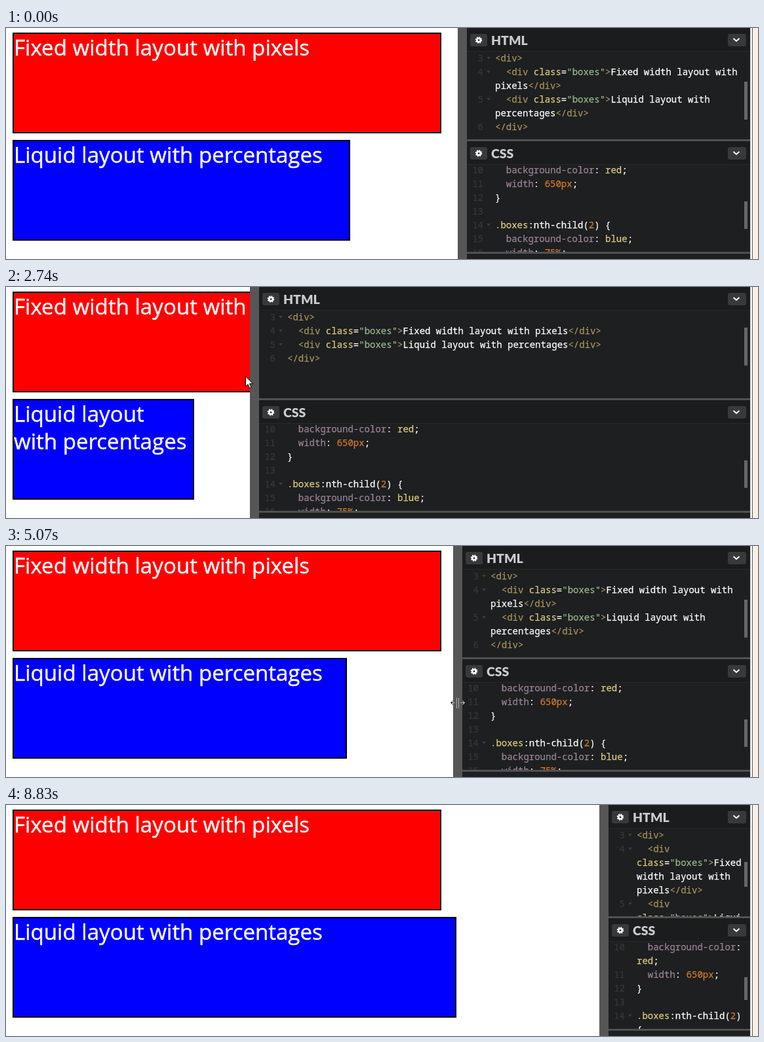
Recreate the animation shown at these times as an HTML page. Size 1147 px wide and 353 px high, loop 9.76 s.

```html
<!DOCTYPE html>
<html lang="en">
<head>
<meta charset="utf-8">
<title>Fixed and liquid layout</title>
<style>
html, body { margin: 0; width: 100%; height: 100%; overflow: hidden; background: #fff; }
#stage { position: relative; width: 1147px; height: 353px; overflow: hidden; background: #fff; isolation: isolate; }
#stage div, #cursor { position: absolute; }
.box { left: 10px; width: 650px; height: 150px; border: 2px solid #000; color: #fff;
  font: 33.1px/42px "Open Sans", "Noto Sans", sans-serif; -webkit-text-stroke: .45px; }
#fixed { top: 7px; background: #f00; white-space: nowrap; }
#liquid { top: 171px; background: #00f; box-sizing: border-box; height: 154px; padding-right: 4px; }
#bar { top: 0; width: 14px; height: 353px; background: #565656; }
#editor { top: 0; right: 12px; height: 353px; background: #1d1f20; }
.panel { left: 0; right: 0; overflow: hidden; background: #1d1f20; }
.head { top: 0; left: 0; right: 0; height: 35px; background: #1b1c1d; border-bottom: 1px solid #27292b; }
.head b { position: absolute; left: 37px; top: 6px; color: #cbcccd; font: 900 19.4px/25px Lato, sans-serif; }
.head svg { position: absolute; top: 9px; height: 19px; background: #37393b; border-radius: 3px; }
.rule { left: 0; right: 0; height: 3px; background: #505152; }
.code { left: 43px; right: 10px; color: #fff; font: 14px/21px "Noto Sans Mono", "DejaVu Sans Mono", monospace;
  -webkit-text-stroke: .25px; white-space: pre-wrap; overflow-wrap: break-word; }
.code p { position: relative; margin: 0; min-height: 21px; }
.code i { position: absolute; left: -43px; width: 25px; text-align: right; font-style: normal; color: #36383a; }
.code i.fold::after { content: ""; position: absolute; left: 30px; top: 9px; border: 3px solid transparent; border-top: 4px solid #3a3c3e; }
.tag { color: #a7925a; } .key { color: #ddca7e; } .str { color: #96b38a; }
.prop { color: #9a8297; } .num { color: #d0782a; }
.thumb { right: 4px; width: 5px; background: #66676a; }
#edge { left: 1135px; top: 0; width: 12px; height: 353px;
  background: linear-gradient(90deg, #d9d9da 1px, #f4f4f4 1px 3px, #55565a 3px 4px, #f4f4f4 4px 5px, #fdefe2 5px); }
#cursor { left: 0; top: 0; overflow: visible; width: 1px; height: 1px; }
</style>
</head>
<body>
<div id="stage">
  <div id="fixed" class="box">Fixed width layout with pixels</div>
  <div id="liquid" class="box">Liquid layout with percentages</div>
  <div id="bar"></div>
  <div id="editor"></div>
  <div id="edge"></div>
  <svg id="cursor">
    <g id="arrow"><path d="M.5 .5V16L4 12.7L6.5 18.5L9 17.4L6.5 11.8H11.5Z" fill="#fff" stroke="#000"/></g>
    <g id="col" fill="none" stroke="#fff"><path d="M-1.5-8V8M1.5-8V8M-4-.5H-10M-7.5-3.5L-10.5-.5L-7.5 2.5M4-.5H10M7.5-3.5L10.5-.5L7.5 2.5"/></g>
    <g id="row" fill="none" stroke="#fff"><path d="M-8-1.5H8M-8 1.5H8M.5-4V-10M-2.5-7.5L.5-10.5L3.5-7.5M.5 4V10M-2.5 7.5L.5 10.5L3.5 7.5"/></g>
    <g id="beam" fill="none" stroke="#fff"><path d="M-3-8.5H-1L.5-7.5L2-8.5H4M.5-7.5V7.5M-3 8.5H-1L.5 7.5L2 8.5H4"/></g>
  </svg>
</div>
<script>
const LOOP = 9760;
const $ = id => document.getElementById(id);

const span = (kind, text) =>
  `<span class="${kind}">${text.replace(/</g, "&lt;").replace(/>/g, "&gt;")}</span>`;
const boxLine = text => "  " + span("tag", "<div") + " " + span("key", "class") + "=" +
  span("str", '"boxes"') + span("tag", ">") + text + span("tag", "</div>");
const rule = (name, kind, value) => `  ${span("prop", name)}: ${span(kind, value)};`;

const html = [
  span("tag", "<div>"),
  boxLine("Fixed width layout with pixels"),
  boxLine("Liquid layout with percentages"),
  span("tag", "</div>")
];
const css = [
  rule("background-color", "key", "red"),
  rule("width", "num", "650px"),
  "}",
  "",
  span("key", ".boxes") + ":nth-child(" + span("num", "2") + ") {",
  rule("background-color", "key", "blue"),
  rule("width", "num", "75%")
];

// Lines that open a block carry a fold mark.
const opensBlock = line => line.endsWith("{") || (line.includes("&lt;div") && !line.startsWith("&lt;/"));

function panel(title, top, height, codeTop, lines, first) {
  const rows = lines.map((line, i) =>
    `<p><i class="${opensBlock(line) ? "fold" : ""}">${first + i}</i>${line}</p>`).join("");
  return `<div class="panel" style="top:${top}px;height:${height}px">
    <div class="code" style="top:${codeTop}px">${rows}</div>
    <div class="head">
      <svg style="left:5px" width="26" height="19" fill="none" stroke="#fff">
        <circle cx="13" cy="9.5" r="2.8" stroke-width="2.6"/>
        <circle cx="13" cy="9.5" r="4.5" stroke-width="1.6" stroke-dasharray="1.8 1.734"/></svg>
      <b>${title}</b>
      <svg style="right:6px" width="28" height="19" fill="none" stroke="#fff" stroke-width="2">
        <path d="M8.5 7L13 11L17.5 7"/></svg>
    </div></div>`;
}

$("editor").innerHTML =
  panel("HTML", 0, 170, 35, html, 3) +
  panel("CSS", 173, 169, 33, css, 10) +
  '<div class="rule" style="top:170px"></div><div class="rule" style="top:342px"></div>' +
  '<div class="thumb" id="htmlThumb"></div><div class="thumb" id="cssThumb"></div>';

// A value that eases through [start, end, goal] moves and rests between them.
const glide = (from, ...moves) => t => moves.reduce((v, [start, end, goal]) => {
  const p = Math.min(1, Math.max(0, (t - start) / (end - start)));
  return v + (goal - v) * p * p * (3 - 2 * p);
}, from);

const divider = glide(689, [1380, 2550, 373], [2700, 3200, 313], [3830, 4760, 668],
  [4905, 5965, 884], [5965, 6340, 905]);
const hoverX = glide(183, [70, 220, -139], [370, 1080, 0], [5965, 6340, 75], [7040, 7430, 210]);
const hoverY = glide(292, [70, 220, 165], [370, 1080, 190], [1380, 2120, 136], [3200, 3830, 182],
  [3830, 5070, 240], [5965, 6340, 325]);

function cursorKind(x, y, bar) {
  if (x < bar - 3) return "arrow";
  if (x <= bar + 14) return "col";
  return Math.abs(y - 180) < 10 ? "row" : "beam";
}

function drawCursor(t, bar) {
  const lead = t < 4770 ? 120 : 0; // the divider trails the hand in the early drags
  const x = Math.round(divider(t + lead) + 7 + hoverX(t));
  const y = Math.round(hoverY(t));
  const kind = cursorKind(x, y, bar);
  for (const g of $("cursor").children) g.style.display = g.id === kind ? "inline" : "none";
  const style = $("cursor").style;
  style.display = t >= 70 && t < 7430 ? "block" : "none";
  style.transform = `translate(${x}px,${y}px)`;
  style.mixBlendMode = kind === "arrow" ? "normal" : "difference";
}

function setThumb(id, top, height) {
  $(id).style.top = top + "px";
  $(id).style.height = height + "px";
}

function draw(t) {
  const x = Math.round(divider(t));
  $("bar").style.left = x + "px";
  $("editor").style.left = x + 14 + "px";
  $("liquid").style.width = 0.75 * (x - 8) + 4 + "px";
  const settled = t >= 7200;
  const wraps = (x > 588) + (x > 760);
  setThumb("htmlThumb", settled ? 87 : 62 + wraps * 20, settled ? 38 : 58);
  setThumb("cssThumb", settled ? 263 : x > 858 ? 271 : 265, settled ? 35 : 42);
  drawCursor(t, x);
}

const start = performance.now();
function frame() {
  draw((performance.now() - start) % LOOP);
  requestAnimationFrame(frame);
}
frame();
</script>
</body>
</html>
```
